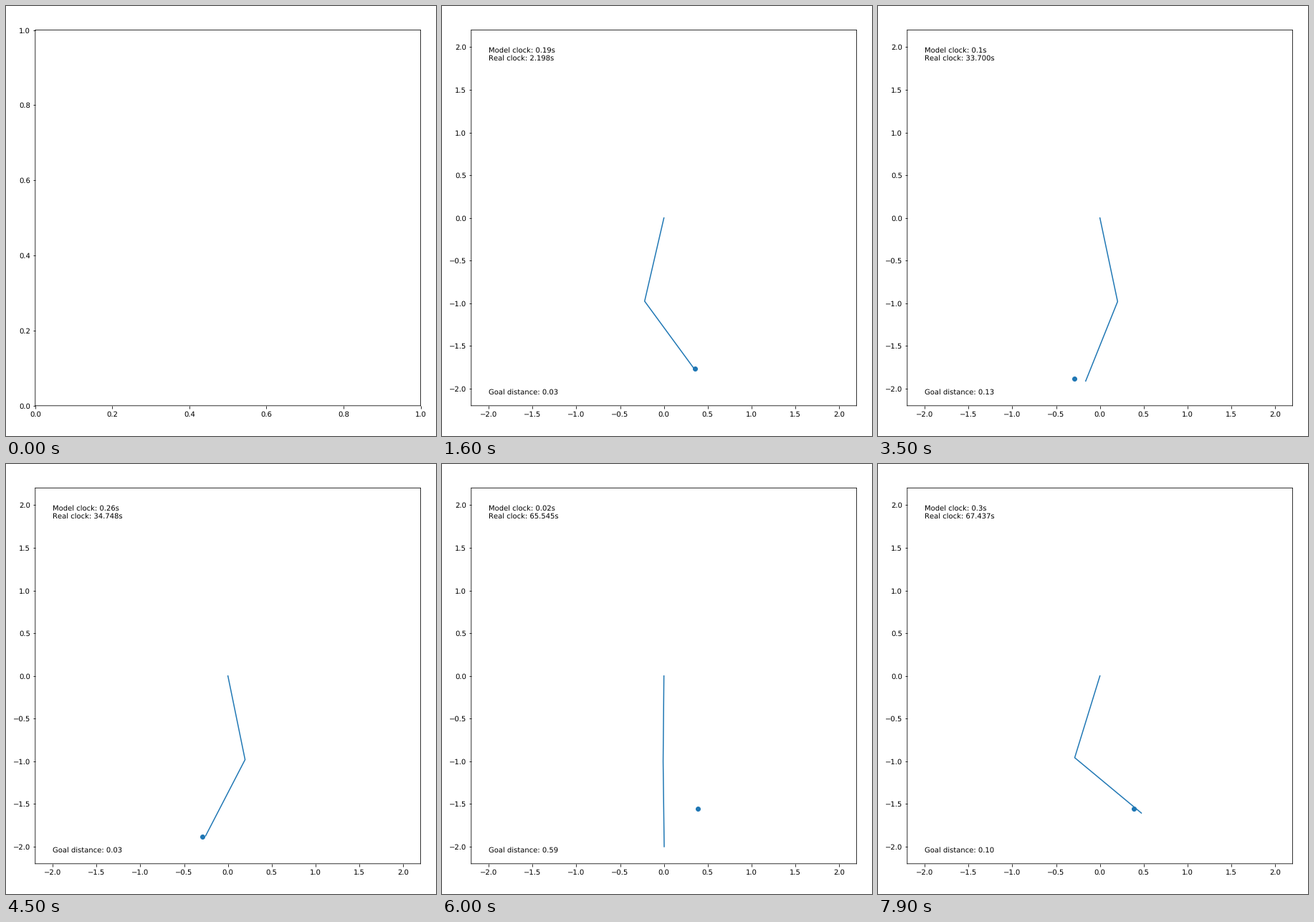
Recreate the animation shown at these times as a matplotlib script. Size 600x600 px, loop 8 s.

```python
import matplotlib.pyplot as plt
import numpy as np
from matplotlib.animation import FuncAnimation

plt.rcParams.update({
    "font.family": "DejaVu Sans",
    "font.size": 10,
    "text.hinting": "none",
    "text.hinting_factor": 1,
})

SIZE, DPI = 600, 72
FRAMES, INTERVAL = 80, 100
DT = 0.01                     # model time per step
HELD = (12, 32)               # frames that repeat the previous picture

# start: first frame; sync: (frame, step, steps per frame)
# clock: (step, real seconds) pairs
# q1: (rest angle, overshoot); q2: (rest angle, lag)
RUNS = [
    dict(start=5, sync=(9, 9, 1.5), goal=(0.354, -1.764),
         clock=((3, 1.141), (9, 1.537), (33, 3.123), (38, 3.453)),
         q1=(-0.218, 0.05), q2=(0.875, 0.394)),
    dict(start=29, sync=(45, 26, 1.55), goal=(-0.288, -1.882),
         clock=((0, 33.045), (26, 34.748), (48, 36.189)),
         q1=(0.186, 0.22), q2=(-0.675, 0.40)),
    dict(start=60, sync=(60, 2, 1.5), goal=(0.391, -1.552),
         clock=((2, 65.545), (12, 66.258), (30, 67.437)),
         q1=(-0.292, 0.0), q2=(1.172, 0.537)),
]


def arm(run, t):
    """Joint positions of the two-link arm at model time t."""
    swing = 1 - np.exp(-(t / 0.066) ** 2.9)
    rest1, over = run["q1"]
    rest2, lag = run["q2"]
    a = rest1 * swing * (1 + over * np.exp(-t / 0.2))
    b = a + rest2 * swing * (1 - lag * np.exp(-t / 0.08))
    x = np.cumsum([0, np.sin(a), np.sin(b)])
    y = np.cumsum([0, -np.cos(a), -np.cos(b)])
    return x, y


fig = plt.figure(figsize=(SIZE / DPI, SIZE / DPI), dpi=DPI, facecolor="white")
left, right, top, bottom = 40.8, 578.5, 33.6, 557.8
ax = fig.add_axes([left / SIZE, 1 - bottom / SIZE,
                   (right - left) / SIZE, (bottom - top) / SIZE])
for spine in ax.spines.values():
    spine.set_snap(False)

line, = ax.plot([], [], color="C0", lw=1.5)
dot = ax.scatter([0], [0], s=36, color="C0")
clocks = ax.text(-2, 2, "", va="top")
distance = ax.text(-2, -2, "", va="top")
parts = (line, dot, clocks, distance)


def set_axes(lo, hi, ticks):
    ax.set(xticks=ticks, yticks=ticks)
    ax.set(xlim=(lo, hi), ylim=(lo, hi))


def draw(k):
    if k in HELD:
        k -= 1
    active = [r for r in RUNS if r["start"] <= k]
    for p in parts:
        p.set_visible(bool(active))
    if not active:
        set_axes(0, 1, np.linspace(0, 1, 6))
        return parts

    set_axes(-2.2, 2.2, np.linspace(-2, 2, 9))
    run = active[-1]
    k0, n0, rate = run["sync"]
    n = int(np.floor(n0 + rate * (k - k0)))
    x, y = arm(run, n * DT)
    gx, gy = run["goal"]
    real = np.interp(n, *zip(*run["clock"]))

    line.set_data(x, y)
    dot.set_offsets([run["goal"]])
    clocks.set_text(f"Model clock: {round(n * DT, 2)}s\nReal clock: {real:.3f}s")
    distance.set_text(f"Goal distance: {np.hypot(x[-1] - gx, y[-1] - gy):.2f}")
    return parts


anim = FuncAnimation(fig, draw, frames=FRAMES, interval=INTERVAL,
                     init_func=lambda: draw(0), repeat=True, repeat_delay=0)
plt.show()
```
